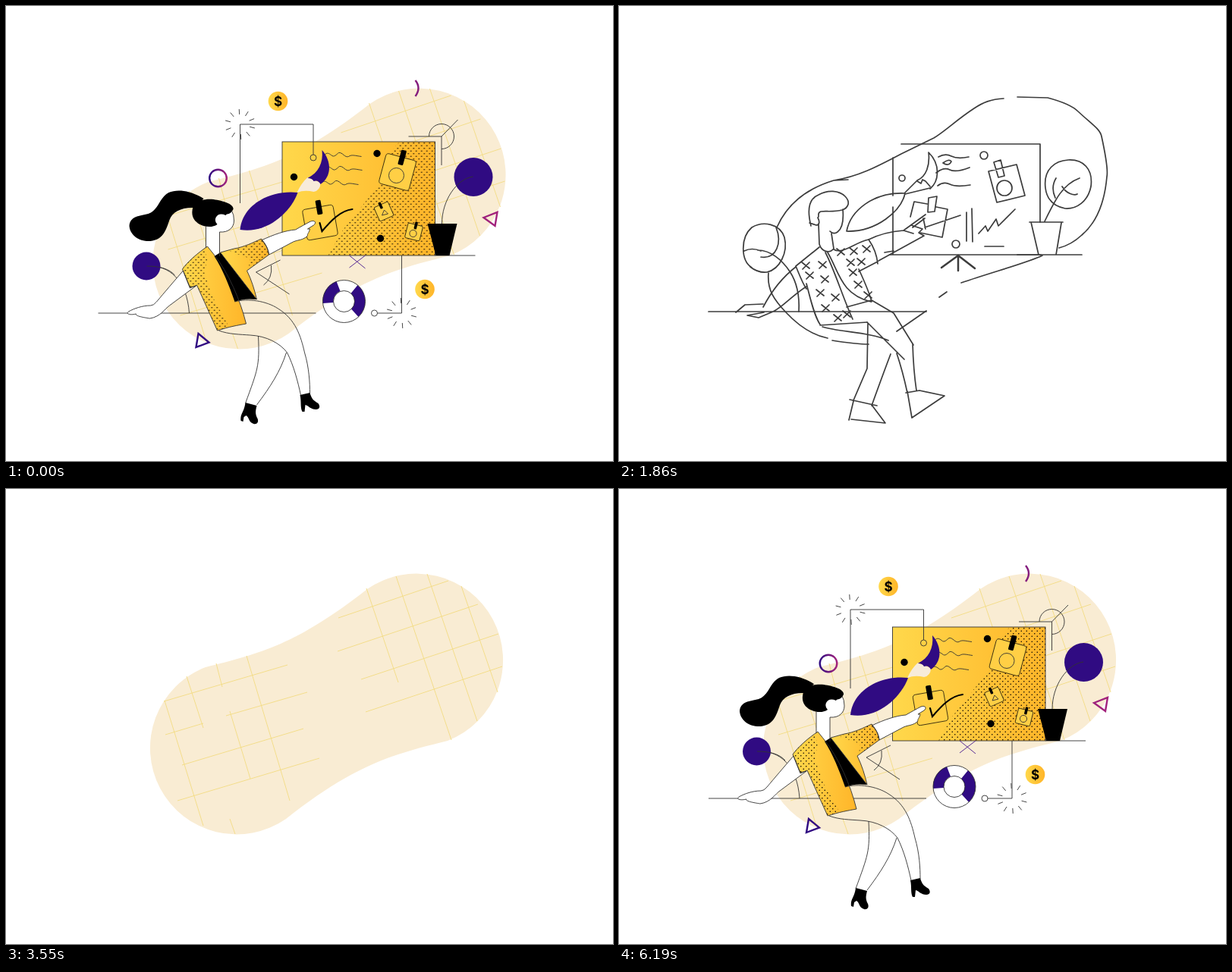
An HTML page for the animation above (8.49 s loop, 800x600 px).

```html
<!DOCTYPE html>
<html lang="en">
<head>
<meta charset="utf-8">
<title>From sketch to illustration</title>
<style>
html, body { margin: 0; width: 100%; height: 100%; overflow: hidden; background: #fff; }
svg { display: block; width: 800px; height: 600px; }
text { font-family: Inter, "Liberation Sans", sans-serif; text-anchor: middle; }
.line { fill: none; stroke: #333; stroke-width: .9; }
.pen { fill: none; stroke: #3c3c3c; stroke-width: 1.7; stroke-linecap: round; stroke-linejoin: round; }
.bold { stroke-width: 2.5; }
.wash { mix-blend-mode: multiply; }
.purple { fill: #300b82; }
.note { fill: #ffcf45; stroke: #3a3010; stroke-width: .9; }
.glow { fill: none; stroke: url(#violet); stroke-width: 2.4; }
</style>
</head>
<body>
<svg viewBox="0 0 800 600">
<defs>
  <linearGradient id="gold"><stop stop-color="#ffd84b"/><stop offset="1" stop-color="#ffb529"/></linearGradient>
  <linearGradient id="violet"><stop stop-color="#300b82"/><stop offset="1" stop-color="#a3237c"/></linearGradient>
  <pattern id="tone" width="7" height="7" patternUnits="userSpaceOnUse">
    <circle cx="1.75" cy="1.75" r=".8"/><circle cx="5.25" cy="5.25" r=".8"/>
  </pattern>
  <path id="wave" d="M0 0C4-4 6-2 9 0C13 4 16-1 19-3C24-4 27 4 32 2C36-1 41 1 49 2"/>
  <path id="armL" d="M230 352C217 367 206 380 195 393Q191 398 187 398C176 398 165 402 158 406C154 409 160 411 168 409C166 412 180 414 186 415C200 413 206 402 212 398L247 372 239 374Z"/>
  <path id="armR" d="M333 312C350 304 365 299 378 298C385 294 392 290 398 287C404 285 406 289 402 292L394 297H397C396 302 393 304 394 306C388 312 382 311 375 314L343 331C342 322 338 316 333 312Z"/>
  <path id="face" d="M260 290V322L271 333 278 329V301C290 302 297 295 297 286Q297 277 293 272L268 275Z"/>
  <path id="coat" d="M262 320C250 328 236 340 229 350L239 375 248 371 275 431C290 426 302 424 313 422C305 390 290 355 270 330Z"/>
  <path id="sleeve" d="M279 328L297 323C310 321 322 315 333 310C339 317 342 324 343 331L314 352C320 364 324 377 327 390Z"/>
</defs>

<g id="sketch">
  <g data-t="2950">
    <path fill="#dddcee" d="M507 122C460 128 455 160 372 195C300 228 225 240 208 292C190 350 190 385 220 408C250 440 300 449 345 444C385 425 415 390 451 365C500 347 560 335 600 312C640 290 650 200 636 172C615 135 580 112 507 122Z"/>
    <path stroke="#e3e2f0" stroke-width="10" d="M242 439L275 443M608 298L616 270M480 344L520 343M380 422L407 390M640 205V228M282 234L305 230"/>
    <path fill="#ebebeb" d="M361 201L374 182H555V328H361Z"/>
    <path stroke="#dddcee" stroke-width="6" d="M407 186H548"/>
  </g>
  <g data-t="2835">
    <path fill="#b9a798" d="M300 297C305 270 335 245 377 247C372 270 340 298 300 297Z"/>
    <path fill="#d9c8ac" d="M355 250L377 247 366 266 352 274Z"/>
    <g fill="#f7f095">
      <ellipse cx="354" cy="127" rx="13" ry="11"/><circle cx="545" cy="373" r="16"/>
      <circle cx="373" cy="226" r="5"/><circle cx="481" cy="197" r="6"/><circle cx="444" cy="314" r="6"/>
    </g>
    <g fill="#f9d6b8">
      <path d="M541 285H585L576 328H553ZM263 435H284L298 460 262 464Z"/>
      <circle cx="437" cy="388" r="28"/>
      <path d="M500 112L517 105 532 114 531 138 512 146 499 136Z"/>
    </g>
    <path fill="#ec9ba1" d="M393 232Q410 215 409 194C423 204 422 229 410 238Z"/>
    <circle cx="440" cy="386" r="11" fill="#fff"/>
  </g>
  <g data-t="2720">
    <g fill="#d2eadf">
      <path d="M175 345C160 335 160 305 175 292C190 283 212 287 218 305C223 325 212 347 195 351Z"/>
      <ellipse class="wash" cx="592" cy="235" rx="30" ry="32"/>
      <path d="M300 397L333 388 362 405 387 445 392 507 379 509 366 460 356 462 333 526 305 520 327 478V419L270 422 308 414Z"/>
    </g>
    <path fill="#93b0d2" d="M487 218L524 209 535 250 498 259ZM385 259L433 268 426 306 384 296Z"/>
    <circle cx="508" cy="240" r="10" fill="#f7f095"/>
    <path d="M402 286L407 294 443 270" fill="none" stroke="#f0e37c" stroke-width="7"/>
    <path fill="#eee" d="M494 206L503 203 508 224 500 226ZM408 253L419 251 416 271 407 272Z"/>
  </g>
  <g data-t="2420">
    <g fill="#fdebd9">
      <path d="M263 273L294 268C296 292 290 302 281 300L283 320Q272 326 264 314Z"/>
      <path d="M233 343Q204 370 190 393L164 392 156 404 184 412 203 403 247 370ZM329 308C350 297 370 297 380 292L403 275 402 303 342 336Z"/>
      <path d="M306 520L335 527 351 550 304 546ZM379 507L410 507 429 514 386 543Z"/>
    </g>
    <path fill="#fff" d="M274 325L332 389 308 397Z"/>
    <path fill="#f7bbba" d="M264 318L233 343 247 370 265 422 308 414C300 390 285 350 273 325ZM283 321Q305 322 329 308L342 337 316 350 333 389 281 328Z"/>
    <path class="wash" fill="#f4dfe0" d="M590 133L612 139 603 190 587 205 583 182Z"/>
  </g>
  <g data-t="2720">
    <path fill="#a4c5e6" d="M253 290C248 270 250 254 263 249C275 242 290 243 298 251C305 258 303 266 294 269L266 271 262 288Z"/>
    <path fill="#a5c3e0" d="M274 325L320 378 331 388 303 396Z"/>
  </g>

  <path class="pen" data-t="500" d="M507 122C490 123 480 127 468 135C445 150 430 165 415 174L372 195C340 212 315 225 283 230M302 229L283 230C250 240 222 260 208 292M525 120L565 121C580 125 597 131 605 139C622 155 634 162 636 172C641 195 645 215 643 225C640 260 630 285 610 302Q596 315 580 319M558 329C540 338 495 350 451 365M432 377L422 384M405 402L366 429M197 352C195 375 205 388 220 404C235 420 255 434 275 438M281 441C300 444 315 446 329 446"/>

  <g class="pen" data-t="1000">
    <path d="M253 290C248 270 250 254 263 249C275 242 290 243 298 251C305 258 303 266 294 269C283 272 272 270 266 271C260 273 265 278 262 279C265 285 264 289 260 289L251 286M295 268C296 280 295 293 288 298C284 301 280 299 278 297M263 287L264 314C267 324 277 327 283 320L280 300"/>
    <path d="M264 318L233 343C238 355 242 366 247 373M247 366C252 385 257 408 265 420M272 325C285 350 295 385 308 413M265 421L327 417M283 321C295 328 310 312 329 308C336 318 340 330 341 340M341 337L316 350M316 347C322 360 330 378 333 390M275 325C290 350 292 380 332 390"/>
    <path d="M329 308C345 300 362 297 375 296L404 275M403 280L387 292M375 296L388 300M385 289L400 294 395 299 402 303 342 336M350 325L362 323M233 344C215 358 200 378 190 397M247 370C230 380 215 398 203 403L184 411 169 408 191 404M154 404L166 394 190 393M118 403H405"/>
    <path d="M300 397L333 388 362 405 388 447M387 445Q388 480 392 507M268 423C290 430 330 430 355 441M327 417L345 435 376 466M366 458Q374 482 380 510M328 418L327 478 309 520M358 459Q347 488 333 527M304 519L340 527M309 521L303 546M306 545L351 550 333 526M378 510L396 507 429 514 386 543 380 508"/>
    <path id="shirt"/>
  </g>

  <g class="pen" data-t="1400">
    <path d="M175 345C160 335 160 305 175 292C190 283 212 287 218 305C223 325 212 347 195 351C185 352 178 348 173 344M183 322C200 322 215 335 225 350C235 365 238 385 237 403M165 323Q175 318 187 323M207 292C215 312 208 334 187 331"/>
    <path d="M562 240C559 215 575 204 592 203C612 202 625 215 622 238C618 258 603 268 588 267C573 264 564 256 562 240M561 284C575 255 585 235 607 227M584 238C590 248 600 250 604 248M575 253C569 240 573 232 576 227M541 285H585M543 285L553 328M583 286L576 328M525 328H610"/>
  </g>

  <path class="pen" data-t="1630" d="M300 297C305 270 335 245 377 247C372 270 340 298 300 297M377 246L393 230M377 248L410 240M393 230C405 225 410 210 408 193C425 210 421 232 410 241M393 231L398 234 400 229 404 231 410 238M427 207Q435 201 438 205Q435 212 427 207"/>

  <g class="pen" data-t="1860">
    <path d="M372 182H555V285M361 200V250M361 265V328M357 328H556"/>
    <path class="bold" d="M425 345L447 329 469 346M447 330V349"/>
    <path d="M487 218L524 209 535 250 498 259ZM494 206L503 203 508 224 500 226ZM408 253L419 251 416 271 407 272ZM406 261L389 258 384 278M418 265L433 268 426 305 397 299M403 292L450 276M401 280L404 294"/>
    <path d="M421 199Q430 194 438 198T461 199M418 220Q428 212 436 216T462 213M420 237Q428 231 436 235T463 236M465 267L466 311M458 272V310M474 300L483 290 486 297 497 281 500 290 522 268M482 317H507"/>
    <circle cx="508" cy="240" r="10"/><circle cx="373" cy="227" r="4"/><circle cx="481" cy="197" r="5"/><circle cx="444" cy="314" r="5"/>
  </g>

  <g class="pen" data-t="2290">
    <path d="M303 240V157H400V202M466 312H521V413H481M260 459H296M262 457L280 436 296 457"/>
    <path class="bold" d="M358 175C370 185 375 200 365 214M388 392C400 402 397 412 390 422"/>
    <path d="M296 140L301 150M312 140L310 150M288 157H297M291 174L299 166M318 160L329 164M314 168L322 174M509 399L513 405M520 397V403M532 401L527 406M535 411H544M531 418L538 425M519 426V433M509 424L505 430"/>
    <path stroke-width="1.1" d="M443 160L565 123M443 165L552 126M468 128L492 178M545 122L565 205M556 165L600 150M535 190L625 186M560 205L597 146M605 205L635 265M371 336L330 352L370 379M340 348Q356 352 344 371M360 347Q370 355 370 370"/>
    <path d="M592 133L583 182 587 205 603 190 612 140M602 136L595 184M583 182L605 186M558 166Q575 156 579 175T558 178"/>
    <circle cx="400" cy="207" r="4"/><circle cx="476" cy="412" r="5.5"/>
    <ellipse cx="354" cy="127" rx="12" ry="10"/><circle cx="545" cy="373" r="15.5"/>
    <circle class="bold" cx="515" cy="128" r="14"/>
    <ellipse cx="437" cy="388" rx="28" ry="26"/><circle cx="440" cy="386" r="11.5"/>
    <path d="M434 363L436 374M451 379L463 373M450 394L459 407M431 394L423 408"/>
    <path fill="#3c3c3c" d="M414 378L428 373 432 378 427 384 428 393 424 397 427 404 418 402 416 396 420 392 414 388 419 384Z"/>
    <g fill="#333" stroke="none"><text x="354" y="132" font-size="14">$</text><text x="545" y="382" font-size="25">$</text></g>
  </g>
</g>

<g id="final">
  <g data-t="3550">
    <path fill="#f9ecd3" d="M476 132A114 114 0 1 1 582 332C510 350 462 362 369 435A114 114 0 1 1 263 235C335 217 383 205 476 132Z"/>
    <path fill="none" stroke="#f3dc83" stroke-width=".9" d="M208 280L371 232M290 299L397 268M210 324L260 309M232 364L392 316M226 411L413 355M209 279L260 444M238 247L260 315M277 230L285 261M317 220L374 411M295 293L322 382M295 435L302 455M438 170L583 121M437 214L622 152M468 251L649 191M474 294L654 234M475 131L517 255M514 115L587 331M555 112L621 306M600 128L648 268"/>
  </g>
  <rect data-t="3820" x="360.5" y="182" width="201.5" height="150" fill="url(#gold)" stroke="#333" stroke-width=".9"/>
  <path data-t="5920" fill="url(#tone)" d="M514 183H562V332H421L440 299 475 255 490 236 496 205Z"/>
  <g data-t="4090">
    <g class="line"><use href="#wave" x="416" y="199.5"/><use href="#wave" x="417" y="217.5"/><use href="#wave" x="412" y="236.5"/></g>
    <g transform="translate(512.5 222) rotate(15)"><rect class="note" x="-20.5" y="-20.5" width="41" height="41" rx="4"/><rect x="-2.5" y="-30" width="7" height="20" rx="1.5"/></g>
    <circle class="line" cx="511" cy="226.5" r="10"/>
    <g transform="translate(410.5 288.5) rotate(-10)"><rect class="note" x="-20.5" y="-20.5" width="41" height="41" rx="4"/><rect x="-1.5" y="-29.5" width="7" height="19" rx="1.5"/></g>
    <path fill="none" stroke="#000" stroke-width="2.2" stroke-linecap="round" d="M410 289L413 300C425 286 437 273 453 271"/>
    <g transform="translate(494.5 274) rotate(-24)"><rect class="note" x="-10" y="-10" width="20" height="20" rx="2"/><rect x="-2.5" y="-13.5" width="3.5" height="9" rx="1"/></g>
    <path class="line" d="M492 279L495 272 500 277Z"/>
    <g transform="translate(534 301) rotate(14)"><rect class="note" x="-10" y="-10" width="20" height="20" rx="2"/><rect x="-1.2" y="-14" width="3.5" height="10" rx="1"/></g>
    <circle class="line" cx="533" cy="303" r="4.6"/>
  </g>
  <g data-t="4520"><circle cx="376" cy="228.5" r="4.7"/><circle cx="485.5" cy="197.5" r="4.7"/><circle cx="490" cy="309.5" r="4.7"/></g>

  <g data-t="6190">
    <path class="line" d="M305 263V159H401.5V199M518 332V408H486M527 175H570.5V213M570.5 175L592 153M554 175A16.5 16.5 0 1 1 570.5 191.5M370 383L326 354 358 338M346 345Q348 362 336 371"/>
    <path class="line" id="sparks"/>
    <circle class="line" cx="401.5" cy="203" r="4"/><circle class="line" cx="482" cy="408" r="4"/>
    <g fill="url(#gold)"><circle cx="355" cy="128.5" r="12.8"/><circle cx="548.5" cy="376.5" r="12.8"/></g>
    <g font-size="17" font-weight="700"><text x="355" y="134.5">$</text><text x="548.5" y="382.5">$</text></g>
    <circle class="glow" cx="276" cy="230" r="11.3"/>
    <path class="glow" d="M250 435L264 446.5 247 453ZM626 282L644 275 641 293ZM536 101Q544 111 536 122"/>
    <path d="M449 348L470 332M449 332L470 349" stroke="#5a2d96" stroke-width="1"/>
    <circle cx="442" cy="392.5" r="28" fill="#fff"/>
    <path class="purple" d="M414 395A28 28 0 0 1 432 366L437 379A14 14 0 0 0 428 394ZM460 371A28 28 0 0 1 461 413L451.5 402.5A14 14 0 0 0 451 382Z"/>
    <circle class="line" cx="442" cy="392.5" r="28"/><circle class="line" cx="442" cy="392.5" r="14"/>
  </g>

  <path data-t="4750" class="purple" d="M305 298C308 265 345 245 381 249C372 275 340 304 305 298Z"/>
  <g data-t="4780">
    <path fill="#f7ebda" d="M380 249Q386 236 394 229L411 236Q411 246 402 248Q390 245 380 249Z"/>
    <path class="purple" d="M413 193C426 208 426 228 411 238Q408 232 402 234Q400 230 394 230C408 223 415 210 413 193Z"/>
  </g>

  <path data-t="5550" class="line" d="M118 408H405M562 332H615M182 346C212 344 235 365 238 408"/>
  <g data-t="5010">
    <g class="purple"><circle cx="181.5" cy="346" r="18.5"/><circle cx="612.5" cy="228.5" r="25.5"/></g>
    <g fill="#fff"><use href="#armL"/><use href="#armR"/><use href="#face"/></g>
    <g fill="url(#gold)"><use href="#coat"/><use href="#sleeve"/></g>
  </g>
  <path data-t="5920" fill="url(#tone)" d="M258 325C248 330 236 340 229 350L239 375 248 371 275 431 291 427 268 385 258 355 262 336ZM290 326Q312 321 333 310C339 317 342 324 343 331L316 350 318 336Z"/>
  <g data-t="5280">
    <path d="M257 257C240 246 222 244 211 249C198 256 198 272 184 277C172 280 160 280 159 293C160 306 173 314 187 313C203 311 207 300 212 285C216 274 228 268 246 269Z"/>
    <path d="M242 273C243 260 256 257 270 258C283 260 297 264 296 271C292 279 288 276 286 279Q277 275 273 282Q271 287 275 291C268 296 258 294 252 291C245 287 241 281 242 273Z"/>
    <path d="M271 333L279 328 327 390Q310 388 298 393C290 370 282 350 271 333Z"/>
    <path d="M552 290H591L581 332H563Z"/>
    <path d="M312 526L327 530C325 538 325 541 328 547C330 552 327 555 323 554C316 552 317 545 313 543L310 545 309 551 306 550C305 540 310 540 312 526ZM384 516L397 513C399 520 401 523 408 527C411 531 410 535 405 535C398 535 395 530 391 529L390 538 387 538C384 532 386 525 384 516Z"/>
  </g>
  <g data-t="5550" class="line">
    <path d="M182 346C200 346 212 350 219 358M612 228C590 231 571 260 571 290"/>
    <use href="#armL"/><use href="#armR"/><use href="#coat"/><use href="#sleeve"/>
    <path d="M260 293V322M278 333V301C290 302 297 295 297 286Q297 278 294 273M298 393C315 388 340 392 355 402C378 416 385 438 390 460C396 480 397 500 397 514M277 431C290 436 305 436 318 437C340 438 358 448 367 460C376 478 381 498 385 516M329 438C331 478 328 483 312 527M366 460C358 485 345 505 327 529"/>
  </g>
</g>
</svg>
<script>
const LOOP = 8490, SKETCH = 500, FINAL = 3550;
const $ = id => document.getElementById(id);

const crosses = [246,342, 268,341, 251,355, 271,360, 265,378, 272,398, 288,411, 300,406, 285,384,
  292,324, 309,323, 326,320, 305,338, 319,337, 308,351, 315,367, 328,381];
let d = "";
for (let i = 0; i < crosses.length; i += 2)
  d += `M${crosses[i] - 5} ${crosses[i + 1] - 4}l10 8m0 -8l-9 9`;
$("shirt").setAttribute("d", d);

// Short rays around both ends of the wires
d = "";
for (const [x, y] of [[305, 159], [518, 408]])
  for (let i = 0; i < 10; i++) {
    const a = (i + .4) * Math.PI / 5, c = Math.cos(a), s = Math.sin(a);
    d += `M${x + 13 * c} ${y + 13 * s}L${x + 20 * c} ${y + 20 * s}`;
  }
$("sparks").setAttribute("d", d);

const parts = [...document.querySelectorAll("[data-t]")].map(el => ({ el, start: +el.dataset.t }));
function draw(now) {
  const t = now % LOOP, intro = t < SKETCH;
  $("sketch").style.display = !intro && t < FINAL ? "" : "none";
  $("final").style.display = intro || t >= FINAL ? "" : "none";
  $("final").setAttribute("transform", intro ? "translate(3.5 -3)" : "");
  for (const { el, start } of parts) el.style.display = intro || t >= start ? "" : "none";
}
const begin = performance.now();
function tick() {
  draw(performance.now() - begin);
  requestAnimationFrame(tick);
}
tick();
</script>
</body>
</html>
```
